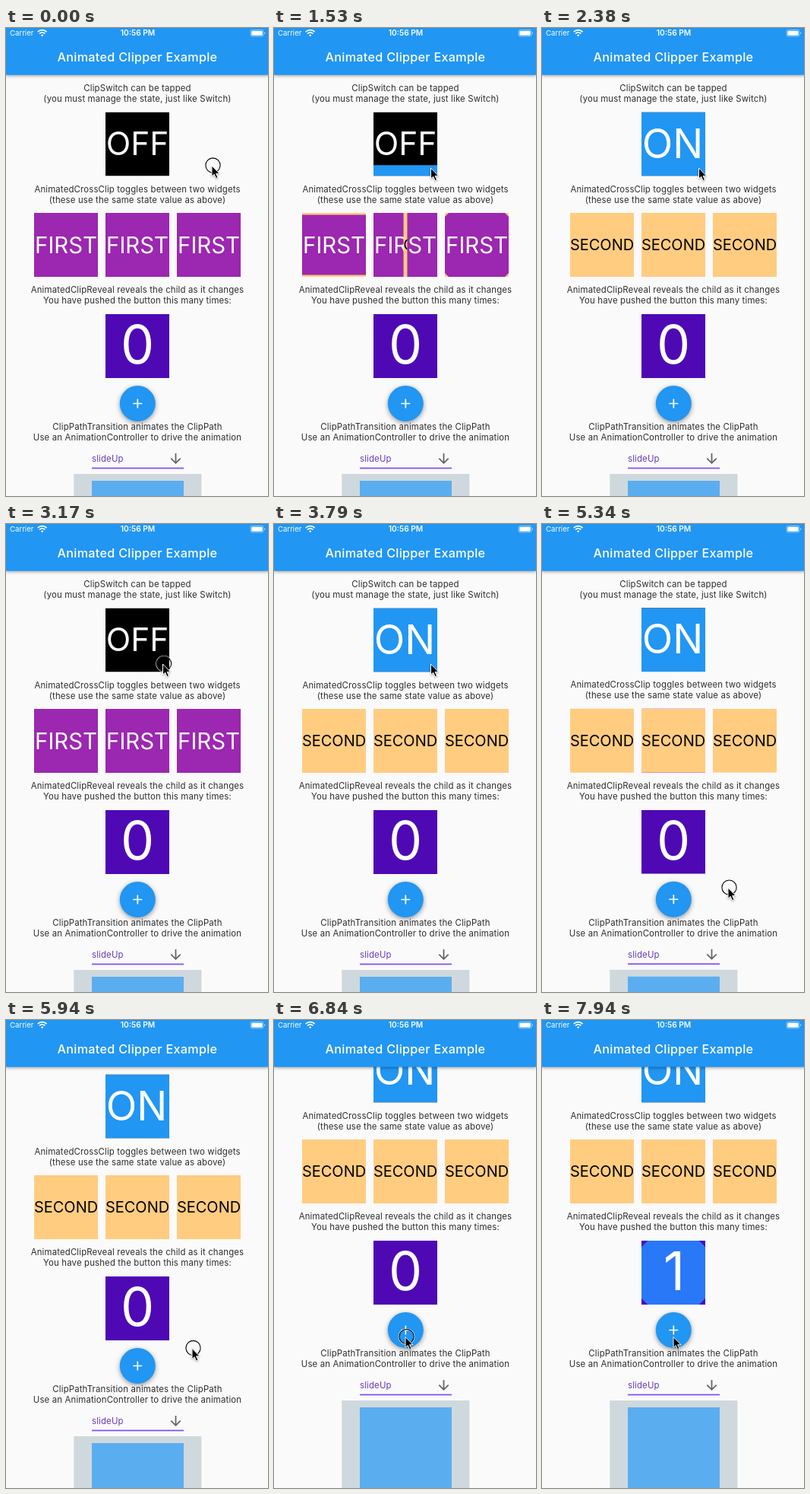
Animation, 345 px wide and 615 px high, one loop 8000 ms. Source, as an HTML page:

```html
<!DOCTYPE html>
<html lang="en">
<head>
<meta charset="utf-8">
<title>Animated Clipper Example</title>
<style>
html, body { margin: 0; width: 100%; height: 100%; overflow: hidden; background: #fafafa; }
svg { display: block; width: 345px; height: 615px; font: 11.4px Inter, "Open Sans", sans-serif; }
.mid { text-anchor: middle; }
.body { fill: #2e2e2e; text-anchor: middle; letter-spacing: .15px; }
.title { font-size: 16.2px; font-weight: 500; letter-spacing: .28px; }
.white { fill: #fff; }
#bar { filter: drop-shadow(0 1.5px 2px #0006); }
#fab { filter: drop-shadow(0 2.5px 3px #0006); }
#arrow { filter: drop-shadow(0 1px 1px #0005); }
</style>
</head>
<body>
<svg viewBox="0 0 345 615">
  <defs>
    <g id="first">
      <rect width="84" height="84" fill="#9c27b0"/>
      <text class="mid white" x="42" y="52.5" font-size="29.4">FIRST</text>
    </g>
    <g id="second">
      <rect width="84" height="84" fill="#ffcc80"/>
      <text class="mid" x="42" y="49.2" font-size="20">SECOND</text>
    </g>
    <clipPath id="tile"><rect width="84" height="84"/></clipPath>
    <clipPath id="riseClip"><rect id="rise" width="84"/></clipPath>
    <clipPath id="shrinkClip"><rect id="shrink" width="84"/></clipPath>
    <clipPath id="stripeClip"><rect id="stripe" height="84"/></clipPath>
    <clipPath id="ovalClip"><circle id="oval" cx="42" cy="42"/></clipPath>
    <clipPath id="revealClip"><circle id="reveal" cx="42" cy="42"/></clipPath>
  </defs>

  <rect width="345" height="615" fill="#fafafa"/>
  <g id="page">
    <text class="body" x="173" y="83">ClipSwitch can be tapped</text>
    <text class="body" x="173" y="97">(you must manage the state, just like Switch)</text>
    <g transform="translate(131 110.5)" clip-path="url(#tile)">
      <rect width="84" height="84"/>
      <text class="mid white" x="42" y="56.5" font-size="42.5">OFF</text>
      <g clip-path="url(#riseClip)">
        <rect width="84" height="84" fill="#2196f3"/>
        <text class="mid white" x="41" y="60" font-size="53">ON</text>
      </g>
    </g>

    <text class="body" x="173" y="215.5">AnimatedCrossClip toggles between two widgets</text>
    <text class="body" x="173" y="229.7">(these use the same state value as above)</text>
    <g transform="translate(37 243)">
      <use href="#second"/>
      <use href="#first" clip-path="url(#shrinkClip)"/>
    </g>
    <g transform="translate(131 243)">
      <use href="#first"/>
      <use href="#second" clip-path="url(#stripeClip)"/>
    </g>
    <g transform="translate(225 243)" clip-path="url(#tile)">
      <use href="#second"/>
      <use href="#first" clip-path="url(#ovalClip)"/>
    </g>

    <text class="body" x="173" y="348">AnimatedClipReveal reveals the child as it changes</text>
    <text class="body" x="173" y="362.2">You have pushed the button this many times:</text>
    <g transform="translate(131 376)" clip-path="url(#tile)" font-size="70">
      <rect width="84" height="84" fill="#4e09b4"/>
      <text class="mid white" x="42" y="65">0</text>
      <g clip-path="url(#revealClip)">
        <rect width="84" height="84" fill="#2878f8"/>
        <text class="mid white" x="43" y="65">1</text>
      </g>
    </g>

    <circle id="fab" cx="173.3" cy="493.5" r="23.5" fill="#2196f3"/>
    <circle id="splash" cx="173.3" cy="493.5" fill="#fff"/>
    <path d="M167.3 493.5h12M173.3 487.5v12" stroke="#fff" stroke-width="1.7"/>

    <text class="body" x="173" y="528">ClipPathTransition animates the ClipPath</text>
    <text class="body" x="173" y="542.2">Use an AnimationController to drive the animation</text>
    <text x="113" y="570" fill="#673ab7" letter-spacing=".15">slideUp</text>
    <path d="M223.5 559v12.5M217.3 565.6l6.2 6.2 6.2-6.2" fill="none" stroke="#666" stroke-width="1.8"/>
    <rect x="113" y="577.6" width="121" height="1.7" fill="#7c4dff"/>
    <rect x="89.3" y="586" width="168" height="168" fill="#cfd8dc"/>
    <rect x="113" y="595" width="121" height="121" fill="#5aaef0"/>
  </g>

  <rect id="bar" y="-10" width="345" height="71.7" fill="#2196f3"/>
  <text class="title mid white" x="173" y="44.4">Animated Clipper Example</text>
  <text class="white" x="5" y="10.3" font-size="9.6">Carrier</text>
  <text class="mid white" x="173.5" y="10.4" font-size="10.2" font-weight="600">10:56 PM</text>
  <g fill="none" stroke="#fff" stroke-width="1.7">
    <path d="M41.8 5.2a8.2 8.2 0 0 1 11.8 0M44 7.5a5.2 5.2 0 0 1 7.4 0"/>
    <path d="M47.7 11.2l-1.7-1.8a2.4 2.4 0 0 1 3.4 0z" fill="#fff" stroke="none"/>
  </g>
  <rect x="322" y="2.4" width="17" height="8.6" rx="2.2" fill="none" stroke="#fff" stroke-opacity=".6" stroke-width=".8"/>
  <rect x="323.3" y="3.7" width="14.4" height="6" rx="1.2" fill="#fff"/>
  <path d="M340.2 5.2q1.6 1.5 0 3z" fill="#fff"/>

  <g id="cursor">
    <g id="ring" fill="none">
      <circle r="10" stroke="#fff" stroke-opacity=".8" stroke-width="1.6"/>
      <circle r="9.6" stroke="#000" stroke-width="1.1"/>
    </g>
    <path id="arrow" transform="translate(-1.5 .5)" stroke="#fff" stroke-width="1"
      d="M0 0V14L3.2 11.2 5.6 16.6 8 15.5 5.6 10.3H10.1Z"/>
  </g>
</svg>
<script>
const LOOP = 8000, TILE = 84, CORNER = TILE / Math.SQRT2;
const TOGGLE_MS = 300;
const RELEASE = 5985;
const toggles = [1480, 2450, 3380, 3820, 4320];
const presses = [[0, 20], [1400, 1470], [2290, 2380], [3165, 3260],
                 [3690, 3780], [4250, 4320], [5190, RELEASE], [6830, 6930]];

const $ = id => document.getElementById(id);
const set = (id, attrs) => {
  for (const name in attrs) $(id).setAttribute(name, attrs[name]);
};
const progress = (t, start, end) => Math.min(1, Math.max(0, (t - start) / (end - start)));
const smooth = u => u * u * (3 - 2 * u);
const easeIn = u => u ** 3;
const easeOut = u => 1 - (1 - u) ** 2;

// cubic-bezier(.42, 0, .58, 1), solved for x by bisection
function easeInOut(x) {
  let low = 0, high = 1;
  for (let i = 0; i < 20; i++) {
    const s = (low + high) / 2, r = 1 - s;
    if (3 * r * r * s * .42 + 3 * r * s * s * .58 + s ** 3 < x) low = s; else high = s;
  }
  return smooth(low);
}

// time, x, y, easing towards this point
const path = [
  [0, 272.5, 180.5],
  [740, 272.5, 180.5],
  [1060, 206, 517, smooth],
  [1390, 208, 183.5, smooth],
  [4570, 208, 183.5],
  [5010, 246.5, 478, smooth],
  [5200, 246.5, 478],
  [5940, 246.5, 431, easeIn],
  [RELEASE, 246.5, 431],
  [6110, 246.5, 315, easeOut],
  [6480, 246.5, 315],
  [6820, 174.5, 416, smooth],
  [LOOP, 174.5, 416]
];

function cursorAt(t) {
  const i = path.findIndex(point => point[0] > t);
  const [t0, x0, y0] = path[i - 1], [t1, x1, y1, ease = smooth] = path[i];
  const u = ease(progress(t, t0, t1));
  return [x0 + (x1 - x0) * u, y0 + (y1 - y0) * u];
}

function switchValue(t) {
  const i = toggles.findLastIndex(start => start <= t);
  if (i < 0) return 0;
  const u = progress(t, toggles[i], toggles[i] + TOGGLE_MS);
  return i % 2 ? 1 - u : u;
}

function draw(t) {
  const on = switchValue(t), cross = easeInOut(on);
  set('rise', { y: TILE * (1 - on), height: TILE * on });
  set('shrink', { y: TILE * cross / 2, height: TILE * (1 - cross) });
  set('stripe', { x: TILE * (1 - cross) / 2, width: TILE * cross });
  set('oval', { r: CORNER * (1 - cross) });
  set('reveal', { r: CORNER * progress(t, 7262, 8012) });

  const scroll = 39 * easeIn(progress(t, 5200, 5940)) + 47 * easeOut(progress(t, RELEASE, 6330));
  set('page', { transform: `translate(0 ${-scroll})` });

  set('splash', {
    r: 23.5 * easeOut(progress(t, 6870, 7070)),
    opacity: .14 * (1 - progress(t, 7050, 7250))
  });
  set('cursor', { transform: `translate(${cursorAt(t)})` });
  set('ring', { opacity: +presses.some(([down, up]) => t >= down && t < up) });
}

const began = performance.now();
function tick() {
  draw((performance.now() - began) % LOOP);
  requestAnimationFrame(tick);
}
tick();
</script>
</body>
</html>
```
